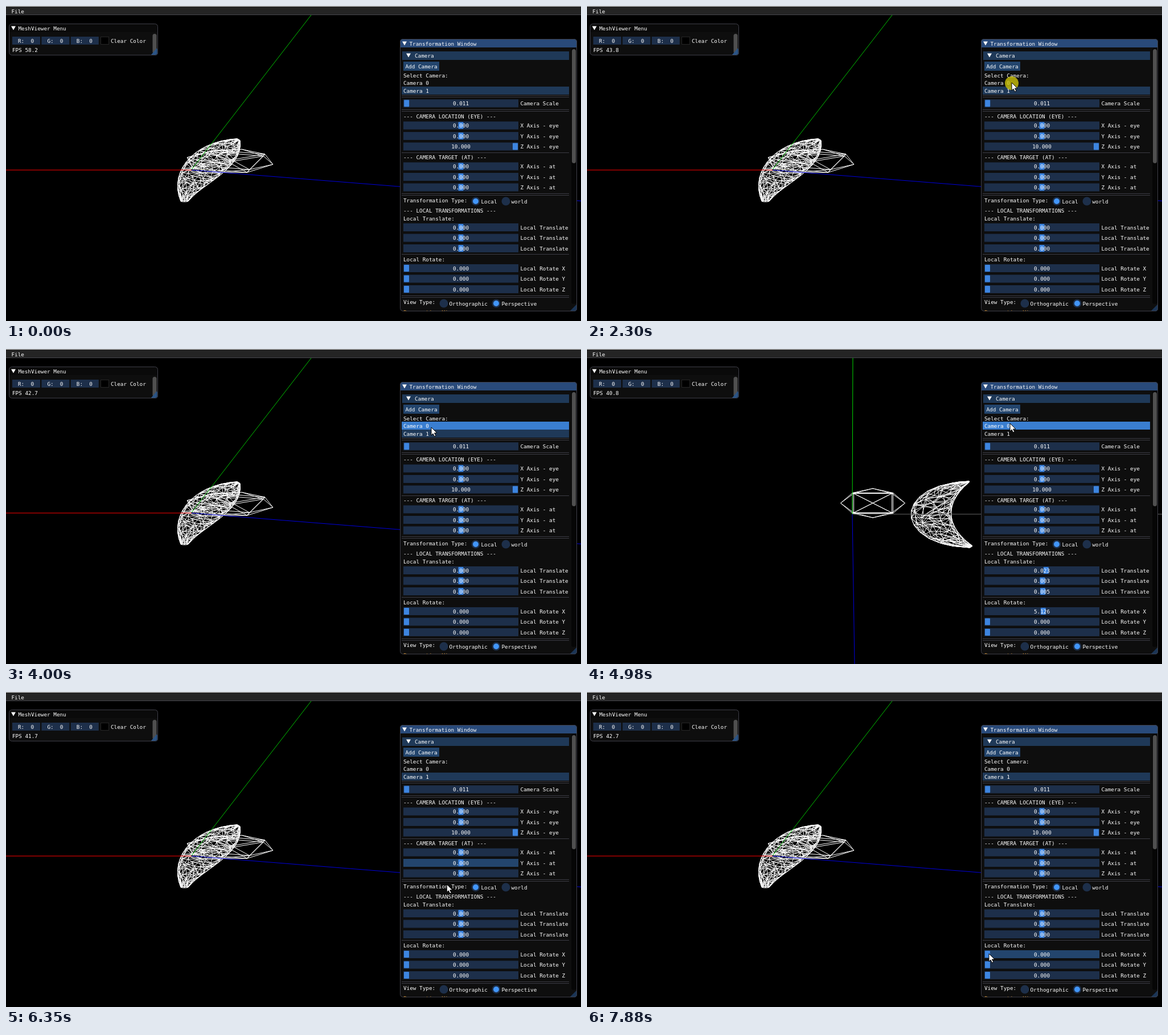
Recreate the animation shown at these times as an HTML page with a canvas. Size 1010 px wide and 555 px high, loop 8 s.

```html
<!DOCTYPE html>
<html lang="en">
<head>
<meta charset="utf-8">
<title>Mesh viewer</title>
<style>
html, body { margin: 0; width: 100%; height: 100%; overflow: hidden; background: #000; }
canvas { display: block; }
</style>
</head>
<body>
<canvas id="stage" width="1010" height="555"></canvas>
<script>
const g = document.getElementById('stage').getContext('2d');
const LOOP = 8000, LAG = 110;
const FRAME = '#1d2f4a', HOVER = '#23456d', HEADER = '#1f3958', GRAB = '#3d85e0', GREY = '#4f4f4f';

// [time, value, ...]
const pointerPath = [
  [70, 927, 497], [850, 784, 186], [2230, 764, 159], [2300, 746, 135], [3460, 745, 148],
  [4000, 747, 138], [4710, 743, 131], [4980, 743, 131], [5400, 746, 147], [5780, 747, 148],
  [5930, 757, 172], [6490, 780, 394], [7030, 786, 419], [7880, 706, 461]
];
const fpsPath = [[0, 58.2], [2300, 43.8], [4000, 42.7], [4980, 40.8], [5930, 41.7], [7030, 41.7], [7880, 42.7]];
// Each click [press, release] toggles the camera on release.
const clicks = [[2270, 2440], [3460, 3660], [4710, 4910], [5330, 5470]];

const mix = (a, b, k) => a + (b - a) * k;

function sample(path, t) {
  const i = Math.max(1, path.findIndex(p => p[0] > t));
  const n = t >= path.at(-1)[0] ? path.length - 1 : i;
  const a = path[n - 1], b = path[n];
  const k = Math.min(1, Math.max(0, (t - a[0]) / (b[0] - a[0])));
  return a.slice(1).map((v, j) => mix(v, b[j + 1], k));
}

function random(seed) {
  return () => (seed = seed * 16807 % 2147483647) / 2147483647;
}

function segment(path, a, b) {
  path.moveTo(...a);
  path.lineTo(...b);
}

function bezier([a, b, c, d], u) {
  const w = 1 - u;
  return [0, 1].map(n => w * w * w * a[n] + 3 * w * w * u * b[n] + 3 * w * u * u * c[n] + u * u * u * d[n]);
}

// Irregular triangle net around a tube between two silhouette curves
function tube(path, left, right, rows, cols) {
  const rnd = random(77);
  for (const side of [-.08, .08]) {
    const net = [];
    for (let r = 0; r <= rows; r++) {
      net[r] = [];
      for (let c = 0; c <= cols; c++) {
        const inner = r > 0 && r < rows && c > 0 && c < cols;
        const jitter = () => inner ? rnd() * .8 - .4 : 0;
        const u = (r + jitter()) / rows, v = Math.PI * (c + jitter()) / cols;
        const a = bezier(left, u), b = bezier(right, u);
        const k = (1 - Math.cos(v)) / 2, s = Math.sin(v) * side;
        net[r][c] = [mix(a[0], b[0], k) - (b[1] - a[1]) * s, mix(a[1], b[1], k) + (b[0] - a[0]) * s];
        if (c) segment(path, net[r][c - 1], net[r][c]);
        if (r) segment(path, net[r - 1][c], net[r][c]);
        if (r && c) {
          if (rnd() < .5) segment(path, net[r - 1][c - 1], net[r][c]);
          else segment(path, net[r - 1][c], net[r][c - 1]);
        }
      }
    }
  }
}

// Box with a pyramid on four sides, projected along three screen axes
function gadget(path, center, ax, ay, az) {
  const put = (x, y, z) => {
    const s = 1 + z * .03;
    return [0, 1].map(n => center[n] + (x * ax[n] + y * ay[n]) * s + z * az[n]);
  };
  const corners = [[-1, -1], [1, -1], [1, 1], [-1, 1]];
  for (const z of [-1, 1]) {
    corners.forEach(([x, y], i) => {
      const p = put(x, y, z);
      segment(path, p, put(...corners[(i + 1) % 4], z));
      segment(path, p, put(x, y, -z));
      segment(path, p, put(x * 1.64, 0, 0));
      segment(path, p, put(0, y * 1.47, 0));
    });
    segment(path, put(-1, -1, z), put(1, 1, z));
    segment(path, put(1, -1, z), put(-1, 1, z));
  }
}

const tilted = new Path2D();
tube(tilted, [[406, 234], [330, 238], [285, 292], [307, 344]], [[411, 237], [418, 286], [345, 312], [320, 344]], 15, 6);
gadget(tilted, [393.5, 273], [46, 3.7], [-14, 14], [-3, 2]);

const side = new Path2D();
tube(side, [[671, 233], [535, 238], [535, 345], [672, 350]], [[672, 234], [628, 270], [628, 312], [677, 347]], 13, 6);
gadget(side, [502, 271.5], [34.5, 0], [0, 17.5], [0, 0]);

function line(color, x1, y1, x2, y2) {
  g.strokeStyle = color;
  g.beginPath();
  segment(g, [x1, y1], [x2, y2]);
  g.stroke();
}
function box(color, x, y, w, h) {
  g.fillStyle = color;
  g.fillRect(x, y, w, h);
}
function poly(color, ...pts) {
  g.fillStyle = color;
  g.beginPath();
  pts.forEach(p => g.lineTo(...p));
  g.closePath();
  g.fill();
}
function round(color, x, y, w, h, r) {
  g.fillStyle = color;
  g.beginPath();
  g.roundRect(x, y, w, h, r);
  g.fill();
}
function disc(color, x, y, r) {
  g.fillStyle = color;
  g.beginPath();
  g.arc(x, y, r, 0, 7);
  g.fill();
}
function text(s, x, y, color = '#fff') {
  g.fillStyle = color;
  g.fillText(s, x, y + 3.5);
}
const arrow = (x, y) => poly('#fff', [x, y], [x + 8, y], [x + 4, y + 7]);
const rule = (...ys) => ys.forEach(y => line('#3c3c44', 695, y + .5, 989, y + .5));

function panel(x, y, w, h, title, caption) {
  const r = x + w, b = y + h;
  round('#0e0e0e', x, y, w, h, 5);
  round(title, x, y, w, 15, [5, 5, 0, 0]);
  poly('#1b3556', [r, b - 13], [r, b - 3], [r - 3, b], [r - 13, b]);
  g.strokeStyle = '#3e3e48';
  g.beginPath();
  g.roundRect(x + .5, y + .5, w - 1, h - 1, 5);
  g.stroke();
  arrow(x + 4, y + 4.5);
  text(caption, x + 16.5, y + 8);
}

function radio(label, x, y, on) {
  disc(FRAME, x, y, 7.5);
  if (on) disc('#4296fa', x, y, 5);
  text(label, x + 9.5, y);
}

function scene(first) {
  g.strokeStyle = '#fff';
  g.stroke(first ? side : tilted);
  if (first) {
    line('#666', 466, 291, 1010, 291);
    line('#00d800', 467, 16, 466, 291);
    line('#0000e0', 466, 291, 470, 555);
  } else {
    line('#f00', 0, 289, 326, 289);
    line('#00c000', 536, 16, 326, 288);
    line('#0000e0', 326, 289, 1010, 343.5);
  }
}

function menu(fps) {
  box('#242424', 0, 0, 1010, 15);
  box('#d0d0d0', 0, 0, 1010, 1);
  box('#45454b', 0, 15, 1010, 1);
  text('File', 9.5, 9);

  panel(5, 31, 262, 56, '#0a0a0a', 'MeshViewer Menu');
  [...'RGB'].forEach((c, i) => {
    const x = 11 + i * 51.4;
    box(FRAME, x, 54, 49, 14);
    text(c + ':  0', x + 10, 61);
  });
  box('#262626', 166, 54, 15, 14);
  box('#000', 167, 55, 13, 12);
  text('Clear Color', 184, 61);
  text('FPS ' + fps.toFixed(1), 11, 77);
  round(GREY, 257.5, 49, 7, 35, 3.5);
  poly('#2b5485', [265, 74], [265, 84], [262, 86], [255, 86]);
}

function slider(label, y, value, min, max, mouse) {
  const [mx, my] = mouse;
  const hot = mx > 698 && mx < 900 && Math.abs(my - y) < 7;
  box(hot ? HOVER : FRAME, 698, y - 7, 202, 14);
  const grab = mix(699, 890, (value - min) / (max - min));
  round(GRAB, grab, y - 6, 9, 12, 1);
  const s = value.toFixed(3);
  text(s, 799 - s.length * 2.81, y);
  text(label, 903.5, y);
}

function group(y, title, label, values, min, max, mouse) {
  text(title, 698, y);
  values.forEach((v, i) => slider(label.replace('*', 'XYZ'[i]), y + 16 + i * 18.5, v, min, max, mouse));
}

function cameraRow(i, chosen, mouse, pressed) {
  const y = 128 + i * 14;
  const hot = mouse[0] > 695 && mouse[1] >= y && mouse[1] < y + 14;
  const color = hot ? (pressed ? '#4296fa' : '#3a7ed0') : chosen && HEADER;
  if (color) box(color, 695, y, 294, 14);
  text('Camera ' + i, 698, y + 7.3);
}

function controls(first, mouse, pressed) {
  panel(692, 58, 311, 480, '#294a7a', 'Transformation Window');
  round('#060606', 993, 74, 9, 451, 4);
  round(GREY, 994, 76, 7, 201, 3.5);

  g.save();
  g.beginPath();
  g.rect(693, 74, 296, 463.5);
  g.clip();
  box(HEADER, 696, 80, 293, 15);
  arrow(703, 83.5);
  text('Camera', 718, 87.5);
  box(HOVER, 698, 98, 63, 16);
  text('Add Camera', 701.5, 106);
  text('Select Camera:', 698, 122);
  cameraRow(0, first, mouse, pressed);
  cameraRow(1, !first, mouse, pressed);
  rule(157, 160, 182, 185, 258, 330, 333, 437, 510, 513);

  slider('Camera Scale', 171.5, .011, .01, 1, mouse);
  group(194.5, '--- CAMERA LOCATION (EYE) ---', '* Axis - eye', [0, 0, 10], -10, 10, mouse);
  group(266.5, '--- CAMERA TARGET (AT) ---', '* Axis - at', [0, 0, 0], -10, 10, mouse);

  text('Transformation Type:', 698, 342);
  radio('Local', 825, 344, true);
  radio('world', 878, 344, false);
  text('--- LOCAL TRANSFORMATIONS ---', 698, 360.5);
  const shift = first ? [.023, .003, .005] : [0, 0, 0];
  group(374, 'Local Translate:', 'Local Translate *', shift, -.3, .3, mouse);
  group(446, 'Local Rotate:', 'Local Rotate *', [first ? 5.126 : 0, 0, 0], 0, 10, mouse);

  text('View Type:', 698, 521.5);
  radio('Orthographic', 769, 524, false);
  radio('Perspective', 861, 524, true);
  text('Perspective View', 698, 539.5, '#c88a2a');
  g.restore();
}

function pointer(x, y) {
  const shape = [[0, 0], [0, 14], [3, 11], [5.5, 16], [8, 15], [5.5, 10], [10, 10]];
  poly('#fff', ...shape.map(([a, b]) => [x + a, y + b]));
  g.strokeStyle = '#000';
  g.stroke();
}

function draw(t) {
  const first = clicks.filter(c => t >= c[1]).length % 2 === 1;
  const pressed = clicks.some(([down, up]) => t >= down && t < up);
  const visible = t >= pointerPath[0][0];
  // The interface reacts slightly after the pointer moves.
  const mouse = visible ? sample(pointerPath, t - LAG) : [-1, -1];
  box('#000', 0, 0, 1010, 555);
  g.font = '9.33px "DejaVu Sans Mono", monospace';
  scene(first);
  menu(sample(fpsPath, t)[0]);
  controls(first, mouse, pressed);
  if (!visible) return;
  const [x, y] = sample(pointerPath, t);
  if (pressed) disc('rgba(205,195,10,.8)', x, y + 1, 12);
  pointer(x, y);
}

function tick() {
  draw(performance.now() % LOOP);
  requestAnimationFrame(tick);
}
tick();
</script>
</body>
</html>
```
